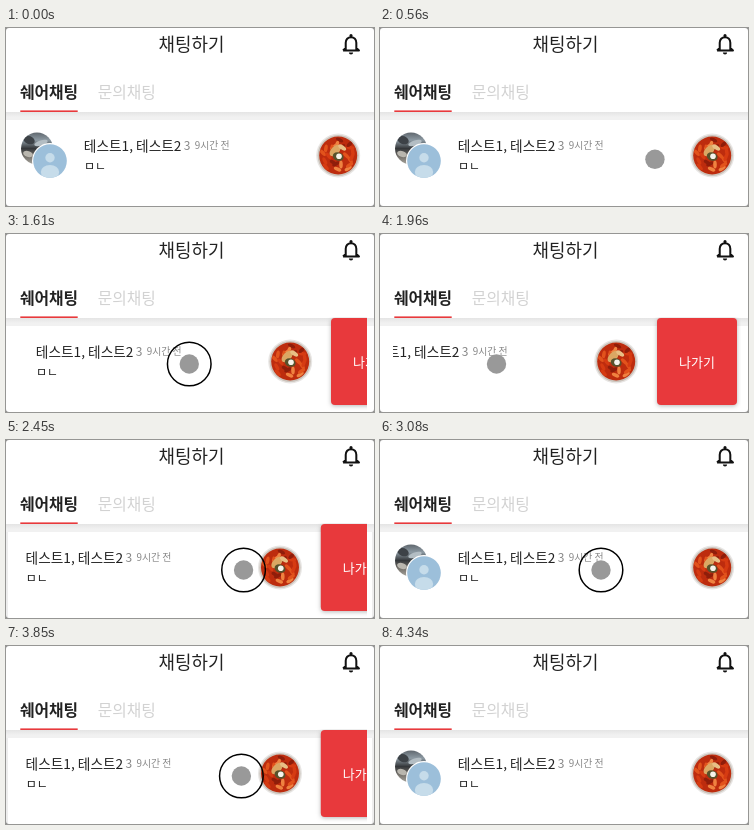
An HTML page with a canvas for the animation above (4.55 s loop, 368 px wide and 178 px high).

```html
<!DOCTYPE html>
<html lang="ko">
<head>
<meta charset="utf-8">
<style>
html, body { margin: 0; width: 100%; height: 100%; overflow: hidden; background: #fff; }
canvas { display: block; width: 368px; height: 178px; }
</style>
</head>
<body>
<canvas id="stage"></canvas>
<script>
const W = 368, H = 178, LOOP = 4550, STEP = 70;
const OPEN = -96, CLOSED = 0;
const RED = '#e8393c', INK = '#222', MUTED = '#888';

const canvas = document.getElementById('stage');
const c = canvas.getContext('2d');
const dpr = window.devicePixelRatio || 1;
canvas.width = W * dpr;
canvas.height = H * dpr;

// The row slides between start and end; the finger is down from press to lift.
const swipes = [
  { press: 1330, start: 1400, end: 1820, lift: 1890, to: OPEN },
  { press: 2030, start: 2240, end: 2730, lift: 2590, to: CLOSED },
  { press: 2940, start: 3080, end: 3430, lift: 3360, to: OPEN },
  { press: 3570, start: 3640, end: 4130, lift: 3990, to: CLOSED }
];
const entry = { x: 226, y: 160 };
const moves = [
  { start: 140, end: 700, x: 284, y: 126 },
  { start: 770, end: 1330, x: 250, y: 130 },
  { start: 1400, end: 1820, x: 116.5, y: 130 },
  { start: 2240, end: 2480, x: 243, y: 130 },
  { start: 2940, end: 3430, x: 132, y: 130 },
  { start: 3640, end: 3880, x: 240, y: 130 },
  { start: 3920, end: 4270, x: 196.5, y: 182 }
];

const lerp = (a, b, k) => a + (b - a) * k;
function progress({ start, end }, t) {
  const k = Math.min(1, Math.max(0, (t - start) / (end - start)));
  return k * k * (3 - 2 * k);
}
const shiftAt = t => swipes.reduce((x, s) => lerp(x, s.to, progress(s, t)), CLOSED);
const pointerAt = t => moves.reduce((p, m) => {
  const k = progress(m, t);
  return { x: lerp(p.x, m.x, k), y: lerp(p.y, m.y, k) };
}, entry);

function randomizer(seed) {
  return () => (seed = seed * 16807 % 2147483647) / 2147483647;
}

function rect(x, y, w, h, color) {
  c.fillStyle = color;
  c.fillRect(x, y, w, h);
}
function oval(x, y, rx, ry, turn, color) {
  c.fillStyle = color;
  c.beginPath();
  c.ellipse(x, y, rx, ry, turn, 0, Math.PI * 2);
  c.fill();
}
const disc = (x, y, r, color) => oval(x, y, r, r, 0, color);

function text(str, x, y, size, color, weight = 400, align = 'left') {
  c.font = `${weight} ${size}px "Noto Sans CJK KR", "Noto Sans CJK", "Noto Sans CJK JP", sans-serif`;
  c.textAlign = align;
  c.fillStyle = color;
  c.fillText(str, x, y);
}
function inDisc(x, y, r, paint) {
  c.save();
  c.beginPath();
  c.arc(x, y, r, 0, Math.PI * 2);
  c.clip();
  paint();
  c.restore();
}
function shade(y0, y1, ...colors) {
  const g = c.createLinearGradient(0, y0, 0, y1);
  colors.forEach((color, i) => g.addColorStop(i / (colors.length - 1), color));
  return g;
}

const bellBody = new Path2D('M7 18V11C7 7.8 9 5.6 12 5.6S17 7.8 17 11V18M4.5 18.2H19.5L17 15.7M4.5 18.2L7 15.7');
function bell() {
  c.save();
  c.translate(332.3, 3.2);
  c.scale(1.06, 1.06);
  c.strokeStyle = '#111';
  c.lineWidth = 1.9;
  c.lineJoin = 'round';
  c.stroke(bellBody);
  disc(12, 4.2, 1.5, '#111');
  c.beginPath();
  c.arc(12, 20, 2, 0, Math.PI);
  c.fill();
  c.restore();
}

function header() {
  text('채팅하기', 185.5, 23.4, 17.9, INK, 400, 'center');
  text('쉐어채팅', 14, 69.8, 15.8, INK, 700);
  text('문의채팅', 91.7, 69.8, 15.8, '#d2d2d2');
  bell();
  rect(0, 84, W, 8, shade(84, 89, '#e4e4e4', '#f1f1f1'));
  rect(14.3, 82.4, 57.4, 1.6, RED);
}

function avatars() {
  inDisc(31, 120.5, 16, () => {
    rect(14, 104, 34, 34, shade(104, 137, '#5d646b', '#8d9aa3', '#34373a', '#77736d', '#a9a7a0'));
    oval(23, 112, 6, 4, 0.4, '#3d4247');
    oval(35, 115, 7, 2.5, -0.3, '#b3bdc3');
    oval(22, 126, 5, 3, 0.3, '#b9b6ae');
  });
  disc(44, 133, 18, '#fff');
  inDisc(44, 133, 16.8, () => {
    rect(26, 115, 36, 36, '#9cbfda');
    disc(44, 129.7, 4.7, '#c6dcea');
    oval(44, 144, 9.2, 7, 0, '#c6dcea');
  });
}

function dish() {
  const x = 332.2, y = 127.5, random = randomizer(41);
  disc(x, y, 22, '#e8e6e4');
  disc(x, y, 20.6, '#cbc3bb');
  disc(x, y, 19, '#bd2c0e');
  inDisc(x, y, 18.6, () => {
    for (let i = 0; i < 22; i++) {
      const a = i * 2.4, r = 8 + random() * 9;
      const color = ['#e2531c', '#d63b12', '#8f1d0a', '#ef8240'][i % 4];
      oval(x + r * Math.cos(a), y + r * Math.sin(a), 4, 1.8, a + random() * 2, color);
    }
  });
  oval(x - 3, y - 5, 7, 4, -0.8, '#dba763');
  oval(x + 4, y - 8, 4.5, 2.2, 0.6, '#e8bf85');
  oval(x, y + 1, 5.5, 4.2, 0.3, '#57522c');
  disc(x + 0.8, y + 0.8, 2.8, '#f5f3eb');
}

function leaveButton() {
  c.save();
  c.shadowColor = 'rgba(0,0,0,.28)';
  c.shadowBlur = 4 * dpr;
  c.shadowOffsetY = dpr;
  c.fillStyle = RED;
  c.beginPath();
  c.roundRect(373, 84, 80, 87, 4);
  c.fill();
  c.restore();
  text('나가기', 413, 133, 13, '#fff', 400, 'center');
}

function row(shift) {
  c.save();
  c.beginPath();
  c.rect(13, 83, 348, 95);
  c.clip();
  c.translate(shift, 0);
  avatars();
  text('테스트1, 테스트2', 77.8, 122.5, 13.7, INK, 500);
  text('3', 177.8, 122.2, 12, MUTED);
  text('9시간 전', 188.7, 121.2, 9.9, MUTED, 500);
  text('ㅁㄴ', 78, 143.2, 12, INK, 500);
  dish();
  if (shift < -8) leaveButton();
  c.restore();
}

function gutters() {
  rect(0, 92, 2, 86, '#ededed');
  rect(W - 2, 92, 2, 86, '#ededed');
}

function pointer(t) {
  if (t < 210 || t >= 4340) return;
  const { x, y } = pointerAt(t);
  disc(x, y, 9.7, '#999');
  if (swipes.some(s => t >= s.press && t < s.lift)) {
    c.strokeStyle = '#000';
    c.lineWidth = 1.5;
    c.beginPath();
    c.arc(x, y, 21.8, 0, Math.PI * 2);
    c.stroke();
  }
}

function corners() {
  c.fillStyle = '#8c8c8c';
  c.beginPath();
  c.rect(0, 0, W, H);
  c.roundRect(0, 0, W, H, 3);
  c.fill('evenodd');
}

function draw(t) {
  c.setTransform(dpr, 0, 0, dpr, 0, 0);
  rect(0, 0, W, H, '#fff');
  header();
  if (swipes.some(s => s.to === CLOSED && t > s.start && t < s.end)) gutters();
  row(shiftAt(t));
  pointer(t);
  corners();
}

const begin = performance.now();
function tick() {
  const t = (performance.now() - begin) % LOOP;
  draw(Math.floor(t / STEP) * STEP);
  requestAnimationFrame(tick);
}
tick();
</script>
</body>
</html>
```
